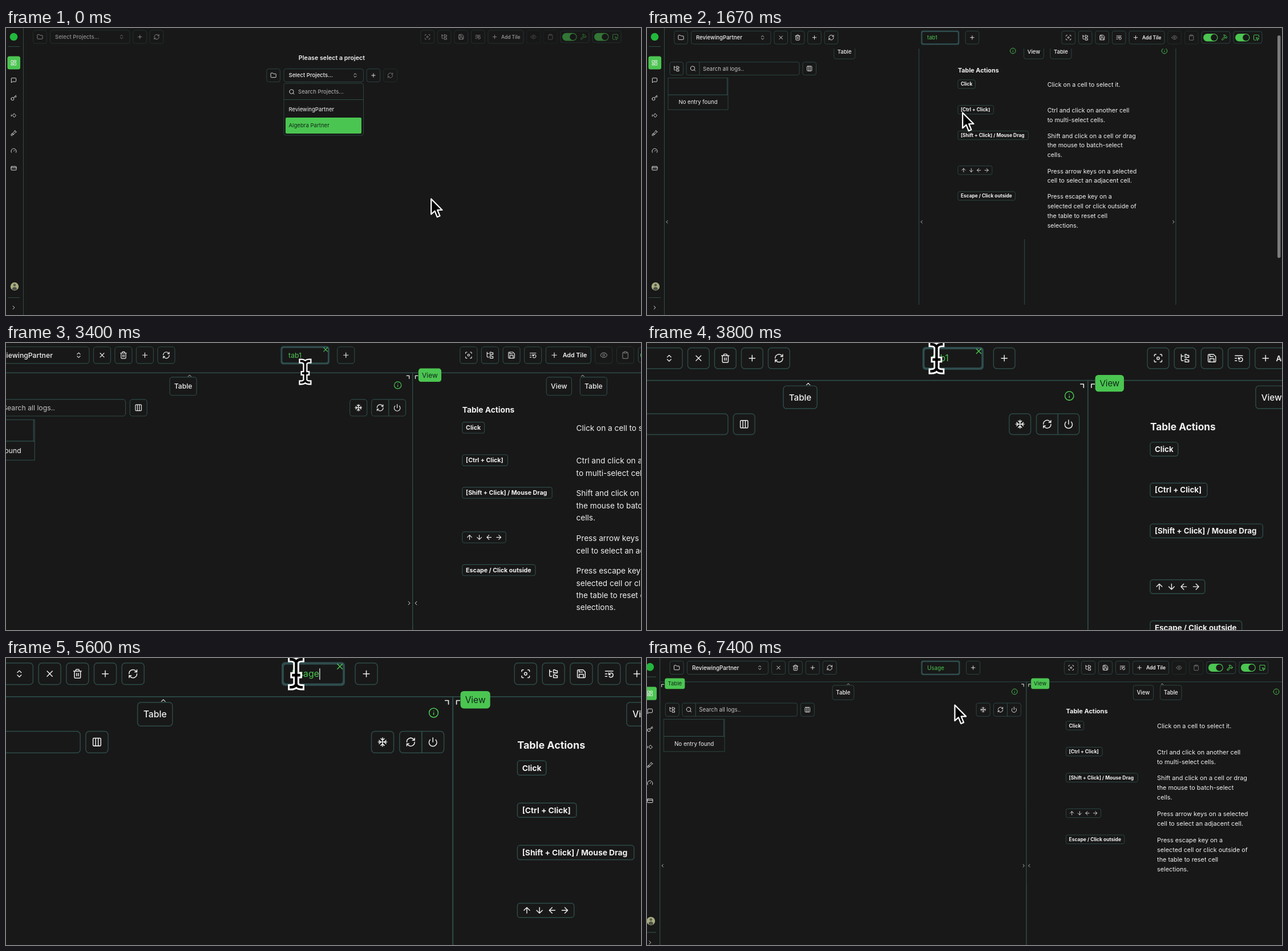
An HTML page for the animation above (7.47 s loop, 1113 by 503 pixels).

```html
<!DOCTYPE html>
<html lang="en">
<head>
<meta charset="utf-8">
<title>Project dashboard</title>
<style>
html, body { margin: 0; width: 100%; height: 100%; overflow: hidden; background: #181818; }
svg { display: block; width: 100vw; height: 100vh; }
text { font-family: Inter, "Liberation Sans", sans-serif; fill: #f1f1f1; white-space: pre; }
.icon { fill: none; stroke: #ececec; stroke-width: 2; stroke-linecap: round; stroke-linejoin: round; }
.box { fill: none; stroke: #2d4b47; stroke-width: .9; }
.solid { fill: #181818; }
.line { fill: none; stroke: #2d4b47; stroke-width: 1.1; }
.green { stroke: #4bc551; }
.dim { opacity: .45; }
</style>
</head>
<body>
<svg id="stage" viewBox="0 0 1113 503" preserveAspectRatio="none"></svg>
<script>
const LOOP = 7470, STEP = 200 / 3, GREEN = '#4bc551', CAM_X = 476;
const PICK = 1130, OPEN = 1525, SLIDE = 1534;
const PROJECT = 'ReviewingPartner', OTHER = 'Algebra Partner';

const circle = (x, y, r) => `M${x - r} ${y}a${r} ${r} 0 1 0 ${2 * r} 0a${r} ${r} 0 1 0 ${-2 * r} 0`;
const ICON = {
  folder: 'M20 20a2 2 0 0 0 2-2V8a2 2 0 0 0-2-2h-8l-2.4-3H4a2 2 0 0 0-2 2v13a2 2 0 0 0 2 2Z',
  sort: 'm7 15 5 5 5-5M7 9l5-5 5 5',
  plus: 'M5 12h14M12 5v14',
  x: 'M18 6 6 18M6 6l12 12',
  refresh: 'M3 12a9 9 0 0 1 15.7-6.3L21 8M21 3v5h-5M21 12a9 9 0 0 1-15.7 6.3L3 16M8 16H3v5',
  scan: circle(12, 12, 3) + 'M3 7V5a2 2 0 0 1 2-2h2M17 3h2a2 2 0 0 1 2 2v2M21 17v2a2 2 0 0 1-2 2h-2M7 21H5a2 2 0 0 1-2-2v-2',
  tree: 'M21 10V5h-4l-1.5-2H12v7ZM21 21v-5h-4l-1.5-2H12v7ZM3 5a2 2 0 0 0 2 2h3M3 3v13a2 2 0 0 0 2 2h3',
  save: 'M16 3l5 5v11a2 2 0 0 1-2 2H5a2 2 0 0 1-2-2V5a2 2 0 0 1 2-2zM17 21v-8H7v8M7 3v5h8',
  restart: 'M21 6H3M7 12H3M7 18H3M12 18a5 5 0 0 0 9-3 4.5 4.5 0 0 0-8-3L11 14M11 10v4h4',
  eye: circle(12, 12, 3) + 'M2 12s3.5-7 10-7 10 7 10 7-3.5 7-10 7S2 12 2 12Z',
  eyeOff: 'M10 5c7-.9 12 7 12 7l-2 3M6.5 6.5C4 8 2 12 2 12s3.5 7 10 7c2 0 4-.6 5.5-1.5M10 10a3 3 0 0 0 4 4M2 2l20 20',
  clipboard: 'M8 2h8v4H8zM16 4h2a2 2 0 0 1 2 2v14a2 2 0 0 1-2 2H6a2 2 0 0 1-2-2V6a2 2 0 0 1 2-2h2',
  hammer: 'm15 12-8.5 8.5a2.1 2.1 0 1 1-3-3L12 9M17.6 15 22 10.6M21 11.7l-2.2-3.7L16 4.6A5.5 5.5 0 0 0 12 3H9c2 1.5 3 3 3 7l2 2h2.5l2.2 2',
  pick: 'M12 12l10 4-4.5 1.5L16 22zM21 11V5a2 2 0 0 0-2-2H5a2 2 0 0 0-2 2v14a2 2 0 0 0 2 2h6',
  trash: 'M3 6h18M19 6v14a2 2 0 0 1-2 2H7a2 2 0 0 1-2-2V6M8 6V4a2 2 0 0 1 2-2h4a2 2 0 0 1 2 2v2M10 11v6M14 11v6',
  search: circle(11, 11, 8) + 'M21 21l-4.3-4.3',
  columns: 'M5 3h14a2 2 0 0 1 2 2v14a2 2 0 0 1-2 2H5a2 2 0 0 1-2-2V5a2 2 0 0 1 2-2zM9 3v18M15 3v18',
  snow: 'M12 2v20M2 12h20M20 16l-4-4 4-4M4 8l4 4-4 4M16 4l-4 4-4-4M8 20l4-4 4 4',
  power: 'M12 2v10M18.4 6.6a9 9 0 1 1-12.8 0',
  info: circle(12, 12, 10) + 'M12 16v-4M12 8h.01',
  up: 'm5 12 7-7 7 7M12 19V5',
  down: 'm5 12 7 7 7-7M12 5v14',
  back: 'm12 5-7 7 7 7M19 12H5',
  next: 'm12 5 7 7-7 7M5 12h14',
  expand: 'M15 3h6v6M9 21H3v-6M21 3l-7 7M3 21l7-7',
  copy: 'M10 8h10a2 2 0 0 1 2 2v10a2 2 0 0 1-2 2H10a2 2 0 0 1-2-2V10a2 2 0 0 1 2-2zM4 16a2 2 0 0 1-2-2V4a2 2 0 0 1 2-2h10a2 2 0 0 1 2 2',
  grip: [5, 12, 19].map(y => [5, 12, 19].map(x => circle(x, y, .7)).join('')).join(''),
  chat: 'M21 15a2 2 0 0 1-2 2H7l-4 4V5a2 2 0 0 1 2-2h14a2 2 0 0 1 2 2z',
  key: circle(7.5, 15.5, 5.5) + 'M21 2l-9.6 9.6M15.5 7.5l3 3L22 7l-3-3',
  diamond: 'M14 5l7 7-7 7-6-7zM3 9v6',
  tube: 'M21 7 6.8 21.2a2.8 2.8 0 0 1-4-4L17 3M16 2l6 6M12 16H4',
  gauge: 'm12 14 4-4M3.3 19a10 10 0 1 1 17.4 0',
  card: 'M4 5h16a2 2 0 0 1 2 2v10a2 2 0 0 1-2 2H4a2 2 0 0 1-2-2V7a2 2 0 0 1 2-2zM2 10h20',
  board: 'M3 3h7v9H3zM14 3h7v5h-7zM14 12h7v9h-7zM3 16h7v5H3z',
  chevL: 'm15 18-6-6 6-6', chevR: 'm9 18 6-6-6-6', chevU: 'm18 15-6-6-6 6'
};

const icon = (name, x, y, size = 11, cls = '') =>
  `<path class="icon ${cls}" d="${ICON[name]}" transform="translate(${x - size / 2} ${y - size / 2}) scale(${size / 24})"/>`;
const box = (x, y, w, h, cls = '', r = 3.6) =>
  `<rect class="box ${cls}" x="${x}" y="${y}" width="${w}" height="${h}" rx="${r}"/>`;
const fill = (x, y, w, h, color, r = 0, extra = '') =>
  `<rect x="${x}" y="${y}" width="${w}" height="${h}" rx="${r}" fill="${color}" ${extra}/>`;
const text = (s, x, y, size = 9.6, weight = 400, extra = '') =>
  `<text x="${x}" y="${y + size * .36}" font-size="${size}" font-weight="${weight}" ${extra}>${s}</text>`;
const mid = (s, x, y, size, weight, extra = '') => text(s, x, y, size, weight, 'text-anchor="middle" ' + extra);
const line = d => `<path class="line" d="${d}"/>`;
const btn = (name, x, y, cls = '') => `<g class="${cls}">${box(x - 11.8, y - 11.4, 23.6, 22.8, 'solid')}${icon(name, x, y)}</g>`;
const label = (s, x, w) => box(x, 47, w, 25) + mid(s, x + w / 2, 59.5, 9.5, 500);
const tag = (s, x, w) => fill(x, 35, w, 18.4, GREEN, 3.5) + mid(s, x + w / 2, 44.2, 9.4, 400, 'style="fill:#10291a"');
const group = (id, body, extra = '') => `<g id="${id}" ${extra}>${body}</g>`;
const picker = (s, x, y) => box(x, y - 11.4, 139.5, 22.8) + text(s, x + 8.5, y, 9.6, 500) + icon('sort', x + 125, y, 10);

function sidebar() {
  const items = ['board', 'chat', 'key', 'diamond', 'tube', 'gauge', 'card'];
  return line('M30.5 0V900M3 32.5H24M3 472.5H24') +
    `<circle cx="13.5" cy="15.5" r="6.8" fill="#22b83c"/>` +
    fill(2.5, 49.5, 22.5, 23, GREEN, 3.5) +
    items.map((n, i) => icon(n, 13.5, 61 + i * 30.8, 11)).join('') +
    `<circle cx="15" cy="453" r="7.2" fill="#a9ad80"/><path d="M11 458q0-4 4-4t4 4q-4 3-8 0z" fill="#4d5248"/><circle cx="15" cy="450.5" r="2.3" fill="#5a5a4c"/>` +
    icon('chevR', 13.5, 490, 11);
}

function actions(y) {
  const toggle = (x, name) => box(x, y - 10.6, 50, 20.8) +
    fill(x + 3, y - 6.8, 25.5, 13.6, GREEN, 6.8) +
    `<circle cx="${x + 21.8}" cy="${y}" r="5.6" fill="#181818"/>` + icon(name, x + 40, y, 12, 'green');
  return ['scan', 'tree', 'save', 'restart'].map((n, i) => btn(n, 738.7 + i * 29.5, y)).join('') +
    box(845, y - 11.4, 62, 22.8) + icon('plus', 856.5, y, 11) + text('Add Tile', 868, y, 8.4, 600) +
    btn('eye', 924.6, y, 'dim') + btn('clipboard', 954.2, y, 'dim') +
    toggle(972, 'hammer') + toggle(1028, 'pick');
}

function startPage() {
  const y = 15.6;
  return `<g opacity=".55">${btn('folder', 59.5, y)}${picker('Select Projects...', 77.5, y)}${btn('plus', 234.7, y)}${btn('refresh', 264, y)}${actions(y)}</g>` +
    mid('Please select a project', 571, 52, 10.7, 600) +
    btn('folder', 468.7, 83) + picker('Select Projects...', 487, 83) + btn('plus', 644, 83) + btn('refresh', 673.6, 83, 'dim') +
    box(487, 97, 139.5, 91) + line('M487 125.5H626.5') + icon('search', 501, 112) +
    text('Search Projects...', 512, 112, 9.6, 400, 'style="fill:#b9b9b9"') +
    group('mark', fill(490, 157, 133, 28, GREEN, 2)) +
    text(PROJECT, 495.5, 143, 9.6, 400, 'id="first"') + text(OTHER, 495.5, 171, 9.6, 400, 'id="second"');
}

function topBar() {
  const y = 16.7;
  return btn('folder', 59.5, y) + picker(PROJECT, 77.5, y) +
    ['x', 'trash', 'plus', 'refresh'].map((n, i) => btn(n, 234.7 + i * 29.4, y)).join('') + actions(y);
}

function tab() {
  return fill(480.3, 4.4, 67, 25, '#2f4d4e', 3.5) + fill(482.6, 6.9, 62.4, 20, '#181818', 2.5) +
    fill(491, 10.2, 19.8, 13.4, '#265a86', 0, 'id="sel"') +
    text('tab1', 491, 16.7, 9.6, 400, `id="name" style="fill:${GREEN}"`) +
    fill(0, 11, .8, 12, '#e8e8e8', 0, 'id="caret"') +
    group('close', icon('x', 542, 9, 10.5, 'green')) + btn('plus', 570, 16.7);
}

function tileOne() {
  return line('M30.5 503V41H661.7V503') + label('Table', 327.7, 37) + icon('chevU', 355, 45, 8) +
    '<path class="icon" style="stroke-width:1" d="M33.5 49.5v-4h4M653.5 45h3.5v4"/>' +
    icon('chevL', 35, 357.7, 9) + icon('chevR', 657, 357.7, 9) +
    btn('tree', 51.8, 89) + box(69, 77.6, 198, 22.8) + line('M92 77.6v22.8') + icon('search', 80.5, 89) +
    text('Search all logs..', 98, 89, 9.6, 400, 'style="fill:#c4c4c4"') + btn('columns', 284.7, 89) +
    btn('snow', 587.2, 89) + box(605.2, 77.6, 47, 22.8) + line('M628.8 77.6v22.8') +
    icon('refresh', 617, 89) + icon('power', 640.5, 89) +
    box(37, 105.5, 105, 55.6, '', 0) + line('M37 135H142M140.5 106V135') + mid('No entry found', 89.5, 147.7, 9.6);
}

function tileTwo() {
  const key = (s, y, w) => box(730, y - 7.6, w, 15.2, '', 2.8) + text(s, 735, y, 8.35, 700);
  const para = (y, rows) => rows.map((s, i) => text(s, 886.8, y + i * 16.75, 10.65)).join('');
  return fill(662, 41, 450, 347, '#181818') + line('M661.7 503V41H1112V503') +
    label('View', 845.7, 34.7) + label('Table', 892, 37) + icon('info', 1092, 58, 11.5, 'green') +
    icon('chevU', 895.5, 45, 8) + icon('chevL', 666.3, 357.7, 9) + icon('chevR', 1108, 357.7, 9) +
    '<path class="icon" style="stroke-width:1" d="M665.5 49v-4h3.5"/>' +
    text('Table Actions', 730, 91.9, 10.8, 700) +
    key('Click', 116.4, 30.5) + key('[Ctrl + Click]', 161.2, 62.5) + key('[Shift + Click] / Mouse Drag', 206, 123.5) +
    box(730, 259.6, 60, 15.2, '', 2.8) +
    ['up', 'down', 'back', 'next'].map((n, i) => icon(n, 740 + i * 13.4, 267.2, 10.5)).join('') +
    key('Escape / Click outside', 312.3, 100.5) +
    para(117, ['Click on a cell to select it.']) +
    para(162, ['Ctrl and click on another cell', 'to multi-select cells.']) +
    para(206.8, ['Shift and click on a cell or drag', 'the mouse to batch-select', 'cells.']) +
    para(268.6, ['Press arrow keys on a selected', 'cell to select an adjacent cell.']) +
    para(313.4, ['Press escape key on a', 'selected cell or click outside of', 'the table to reset cell', 'selections.']);
}

const tags = tag('Table', 39, 34.5) + tag('View', 669.7, 31.5);
const tools = ['expand', 'eyeOff', 'copy', 'grip', 'x'].map((n, i) => btn(n, 526.4 + i * 29.4, 46.2)).join('');
const beam = 'M-5.5-14.8Q-1.2-14.8 0-11.5Q1.2-14.8 5.5-14.8M0-11.5V11.5M-5.5 14.8Q-1.2 14.8 0 11.5Q1.2 14.8 5.5 14.8M-3 2H3';
const beamStroke = (color, width) => `<path d="${beam}" fill="none" stroke="${color}" stroke-width="${width}" stroke-linecap="square"/>`;
const pointer =
  group('arrow', '<path d="M1.2 2.5V29.5L7.5 23.7L11.8 34.3L16.5 32.3L12.2 22H20.5Z" fill="#000" stroke="#fff" stroke-width="2.2" stroke-linejoin="round"/>') +
  group('beam', beamStroke('#fff', 6.4) + beamStroke('#000', 2.8));

document.getElementById('stage').innerHTML =
  '<clipPath id="below"><rect x="0" y="36" width="1200" height="600"/></clipPath>' +
  group('cam',
    sidebar() + group('start', startPage()) +
    group('work', topBar() +
      group('tiles', group('one', tileOne()) + group('two', tileTwo()), 'clip-path="url(#below)"') +
      group('tags', tags) + group('tab', tab()) + group('tools', tools) +
      group('info', icon('info', 641.3, 58, 11.5, 'green')) +
      group('bar', fill(1105, 13, 5.5, 390, '#7b7b7b', 2.7))) +
    group('pointer', pointer));

const $ = id => document.getElementById(id);
const show = (id, on) => $(id).style.display = on ? '' : 'none';
const move = (id, x, y, s = 1) => $(id).setAttribute('transform', `translate(${x} ${y}) scale(${s})`);
const clamp = v => Math.min(1, Math.max(0, v));

// Critically damped spring, 0 to 1
const spring = (t, from, w) => {
  const u = Math.max(0, t - from) / 1000 * w;
  return 1 - (1 + u) * Math.exp(-u);
};
const zoom = t => 1 + .655 * (spring(t, 3183, 6.6) - spring(t, 6492, 6.03));

// Pointer stops: time, x, y
const PATH = [[0, 744, 297], [120, 744, 297], [800, 541, 146], [1150, 541, 146], [1600, 552, 146], [2950, 552, 146],
  [3400, 514, 39.6], [3800, 495.7, 16.2], [6480, 495.7, 16.2], [6800, 513.2, 36.4], [7400, 537.2, 78.6], [LOOP, 538, 81]];
const slope = (i, c) => {
  const a = PATH[i - 1], p = PATH[i], b = PATH[i + 1];
  if (!a || !b || a[c] === p[c] || b[c] === p[c]) return 0;
  return (b[c] - a[c]) / (b[0] - a[0]);
};
function pointAt(t) {
  const i = Math.max(0, PATH.findIndex(p => p[0] > t) - 1), a = PATH[i], b = PATH[i + 1], d = b[0] - a[0], u = (t - a[0]) / d;
  return [1, 2].map(c => {
    const e = u * u * (3 - 2 * u);
    return a[c] + (b[c] - a[c]) * e + d * u * (1 - u) * ((1 - u) * slope(i, c) - u * slope(i + 1, c));
  });
}
const press = t => 1 - .22 * Math.max(...[1080, 4190, 4400].map(c => clamp(1.25 - Math.abs(t - c) / 90)));

function draw(t) {
  const s = zoom(t), [x, y] = pointAt(t);
  move('cam', CAM_X * (1 - s), 0, s);

  show('start', t < PICK);
  show('work', t >= PICK);
  const hover = t > 640;
  move('mark', 0, hover ? -28 : 0);
  $('first').style.fill = hover ? '#10291a' : '#f1f1f1';
  $('second').style.fill = hover ? '#f1f1f1' : '#10291a';

  const open = t >= OPEN, settled = t >= SLIDE + 400;
  const left = Math.pow(1 - clamp((t - SLIDE) / 400), 3);
  show('tiles', open);
  show('info', open);
  show('tags', settled);
  show('bar', open && !settled);
  show('tab', t >= OPEN - 140);
  move('one', 0, -60 * left);
  move('info', 0, -60 * left);
  move('two', -620 * left, -60 * left);

  const typed = Math.floor(clamp((t - 4600) / 750) * 5);
  const name = $('name');
  name.textContent = typed ? 'Usage'.slice(0, typed) : 'tab1';
  show('sel', t >= 4330 && !typed);
  show('caret', typed && t < 6100);
  $('caret').setAttribute('x', 491.2 + name.getComputedTextLength());
  show('close', t >= 3150 && t < 6560);
  show('tools', t >= 6660 && t < 7010);

  const textual = t >= 3080 && t < 6590;
  show('arrow', !textual);
  show('beam', textual);
  move('pointer', x, y, press(t));
}

const begin = performance.now();
function tick() {
  const t = (performance.now() - begin) % LOOP;
  draw(Math.floor((t + 1) / STEP) * STEP % LOOP);
  requestAnimationFrame(tick);
}
tick();
</script>
</body>
</html>
```
